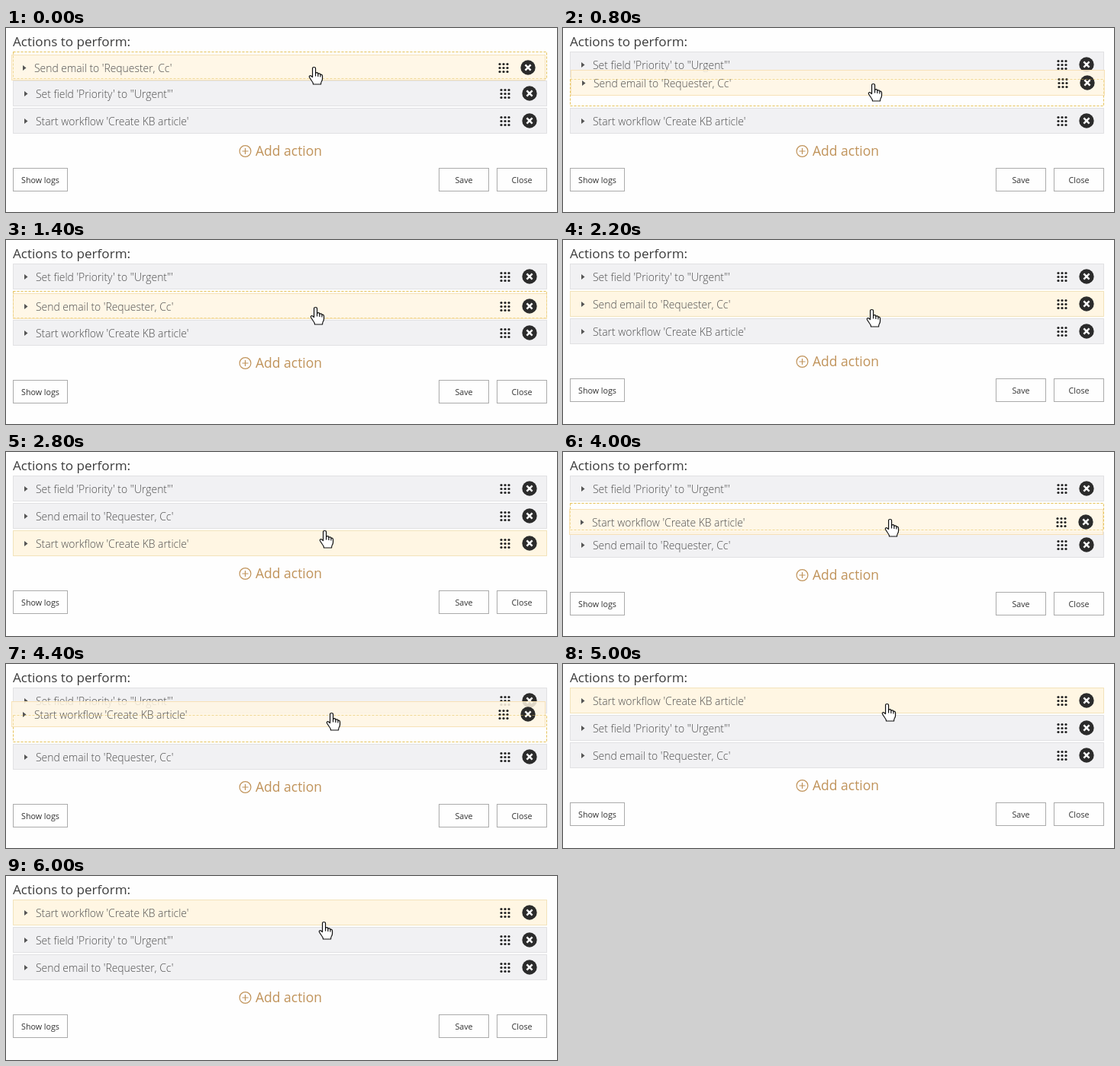
Write an HTML page with a canvas that moves like this. It is 722 px wide and 242 px high and loops after 6200 ms.

```html
<!DOCTYPE html>
<html lang="en">
<head>
<meta charset="utf-8">
<title>Actions to perform</title>
<style>
html, body { margin: 0; width: 100%; height: 100%; overflow: hidden; background: #fefefe; }
canvas { display: block; width: 722px; height: 242px; }
</style>
</head>
<body>
<canvas id="stage"></canvas>
<script>
const W = 722, H = 242, LOOP = 6200, STEP = 200;
const TOP = 31, PITCH = 36, ROW_H = 34, GAP = 2;
const FONT = '"Open Sans", "Noto Sans", sans-serif';
const GOLD = '#c0935a';

const canvas = document.getElementById('stage');
const dpr = window.devicePixelRatio || 1;
canvas.width = W * dpr;
canvas.height = H * dpr;
const ctx = canvas.getContext('2d');

const SEND = "Send email to 'Requester, Cc'";
const SET = "Set field 'Priority' to ''Urgent\"'";
const START = "Start workflow 'Create KB article'";

// Fingertip position: time, x, y
const POINTER = [
  [0, 404, 51], [800, 407, 73], [1400, 406, 88], [1800, 405, 91], [2400, 405, 91],
  [2800, 418, 103], [3200, 430, 117], [3400, 430, 118], [3600, 430, 113], [4000, 429, 88],
  [4400, 427, 64], [4800, 425, 53], [5000, 425, 52], [5400, 423, 54], [6000, 417, 60]
];

// Each drag: the row, the others in order, and the row's left and top over time
const DRAGS = [
  { from: 0, to: 1800, label: SEND, rest: [SET, START], slot: 0,
    path: [[0, 7, 35], [800, 10, 55], [1400, 9, 70], [1800, 9, 74]] },
  { from: 3400, to: 5000, label: START, rest: [SET, SEND], slot: 2,
    path: [[3400, 9, 104], [3600, 8, 99], [4000, 8, 75], [4400, 7, 49], [4800, 7, 37], [5000, 7, 36]] }
];

function at(keys, t) {
  let i = 1;
  while (i < keys.length - 1 && keys[i][0] < t) i++;
  const [a, b] = [keys[i - 1], keys[i]];
  const k = Math.min(1, Math.max(0, (t - a[0]) / (b[0] - a[0])));
  return [1, 2].map(n => Math.round(a[n] + (b[n] - a[n]) * k));
}

function text(str, x, y, size, color, weight = 400, align = 'left') {
  ctx.font = `${weight} ${size}px ${FONT}`;
  ctx.textAlign = align;
  ctx.fillStyle = color;
  ctx.fillText(str, x, y);
}

function disc(x, y, r, fill) {
  ctx.fillStyle = fill;
  ctx.beginPath();
  ctx.arc(x, y, r, 0, 7);
  ctx.fill();
}

function box(x, y, w, h, fill, stroke) {
  ctx.fillStyle = fill;
  ctx.fillRect(x, y, w, h);
  ctx.strokeStyle = stroke;
  ctx.lineWidth = 1;
  ctx.strokeRect(x + .5, y + .5, w - 1, h - 1);
}

function row(label, x, y, warm, lifted) {
  ctx.globalAlpha = lifted ? .85 : 1;
  box(x, y, 700, ROW_H, warm ? '#fff6e3' : '#f1f1f3', lifted ? '#f6dfb0' : warm ? '#f2e3bb' : '#e1e1e3');
  ctx.globalAlpha = 1;
  ctx.save();
  ctx.translate(x, y);
  ctx.fillStyle = '#555';
  ctx.beginPath();
  ctx.moveTo(15, 14);
  ctx.lineTo(19.5, 17.5);
  ctx.lineTo(15, 21);
  ctx.fill();
  text(label, 30, 23, 13.9, '#4c4c4c', 300);
  for (let i = 0; i < 9; i++) disc(640 + i % 3 * 5, 12.5 + Math.floor(i / 3) * 5, 1.6, '#222');
  disc(677, 17, 9.7, '#2b2b2b');
  ctx.strokeStyle = '#fff';
  ctx.lineWidth = 2.5;
  ctx.beginPath();
  for (const s of [-1, 1]) {
    ctx.moveTo(673.4, 17 - 3.6 * s);
    ctx.lineTo(680.6, 17 + 3.6 * s);
  }
  ctx.stroke();
  ctx.restore();
}

function slotBox(y) {
  ctx.strokeStyle = '#e6c35c';
  ctx.lineWidth = 1;
  ctx.setLineDash([3, 2]);
  ctx.strokeRect(9.5, y + .5, 699, 35);
  ctx.setLineDash([]);
}

function button(label, x, y, w) {
  box(x, y, w, 31, '#fefefe', '#ababab');
  text(label, x + w / 2, y + 20, 10.7, '#333', 400, 'center');
}

function footer(y) {
  ctx.strokeStyle = GOLD;
  ctx.lineWidth = 1.2;
  ctx.beginPath();
  ctx.arc(313.5, y + 160, 7.4, 0, 7);
  ctx.moveTo(309.5, y + 160);
  ctx.lineTo(317.5, y + 160);
  ctx.moveTo(313.5, y + 156);
  ctx.lineTo(313.5, y + 164);
  ctx.stroke();
  text('Add action', 327, y + 166, 17.5, GOLD);
  button('Show logs', 9, y + 182, 72);
  button('Save', 567, y + 182, 66);
  button('Close', 643, y + 182, 66);
}

const HAND = new Path2D('M-2 13V2Q-2 0 0 0Q2 0 2 2V8Q3 6.8 4.2 7.2Q5.3 7.5 5.3 9Q6.3 8 7.6 8.5' +
  'Q8.4 9 8.4 10Q9.4 9.3 10.3 10Q11 10.5 11 12V15Q11 17 10 18.5Q9 20 9 22.5H-1Q-1 20.5 -3 18' +
  'L-6 13.5Q-6.8 12 -5.5 11.3Q-4.3 10.8 -2 13Z');
const KNUCKLES = new Path2D('M2 8V12M5.3 9V12.5M8.4 10V13');

function hand(x, y) {
  ctx.save();
  ctx.translate(x - .4, y + .5);
  ctx.lineWidth = 1.2;
  ctx.lineJoin = 'round';
  ctx.fillStyle = '#fff';
  ctx.strokeStyle = '#111';
  ctx.fill(HAND);
  ctx.stroke(HAND);
  ctx.stroke(KNUCKLES);
  ctx.restore();
}

function dragScene(drag, t) {
  const [x, y] = at(drag.path, t);
  // The free slot moves once the leading edge passes a neighbour's middle
  const slot = drag.slot === 0
    ? (y + ROW_H > TOP + PITCH + 19 ? 1 : 0)
    : (y < 48 ? 0 : y < 85 ? 1 : 2);
  slotBox(TOP + slot * PITCH);
  drag.rest.forEach((label, i) => {
    const after = i >= slot;
    row(label, 9, TOP + (after ? i + 1 : i) * PITCH + (after ? GAP : 0), false, false);
  });
  row(drag.label, x, y, true, true);
  ctx.globalAlpha = .5;
  slotBox(TOP + slot * PITCH);
  ctx.globalAlpha = 1;
}

function draw(t) {
  ctx.setTransform(dpr, 0, 0, dpr, 0, 0);
  ctx.fillStyle = '#fefefe';
  ctx.fillRect(0, 0, W, H);
  text('Actions to perform:', 9, 24, 17.1, '#3c3c3c');
  const [px, py] = at(POINTER, t);
  const drag = DRAGS.find(d => t >= d.from && t < d.to);
  footer(drag ? GAP : 0);
  if (drag) dragScene(drag, t);
  else {
    const order = t < 3400 ? [SET, SEND, START] : [START, SET, SEND];
    const hover = Math.floor((py - TOP) / PITCH);
    order.forEach((label, i) => row(label, 9, TOP + i * PITCH, i === hover, false));
  }
  hand(px, py);
}

const begin = performance.now();
function tick() {
  const t = (performance.now() - begin) % LOOP;
  draw(Math.floor(t / STEP) * STEP);
  requestAnimationFrame(tick);
}
tick();
</script>
</body>
</html>
```
